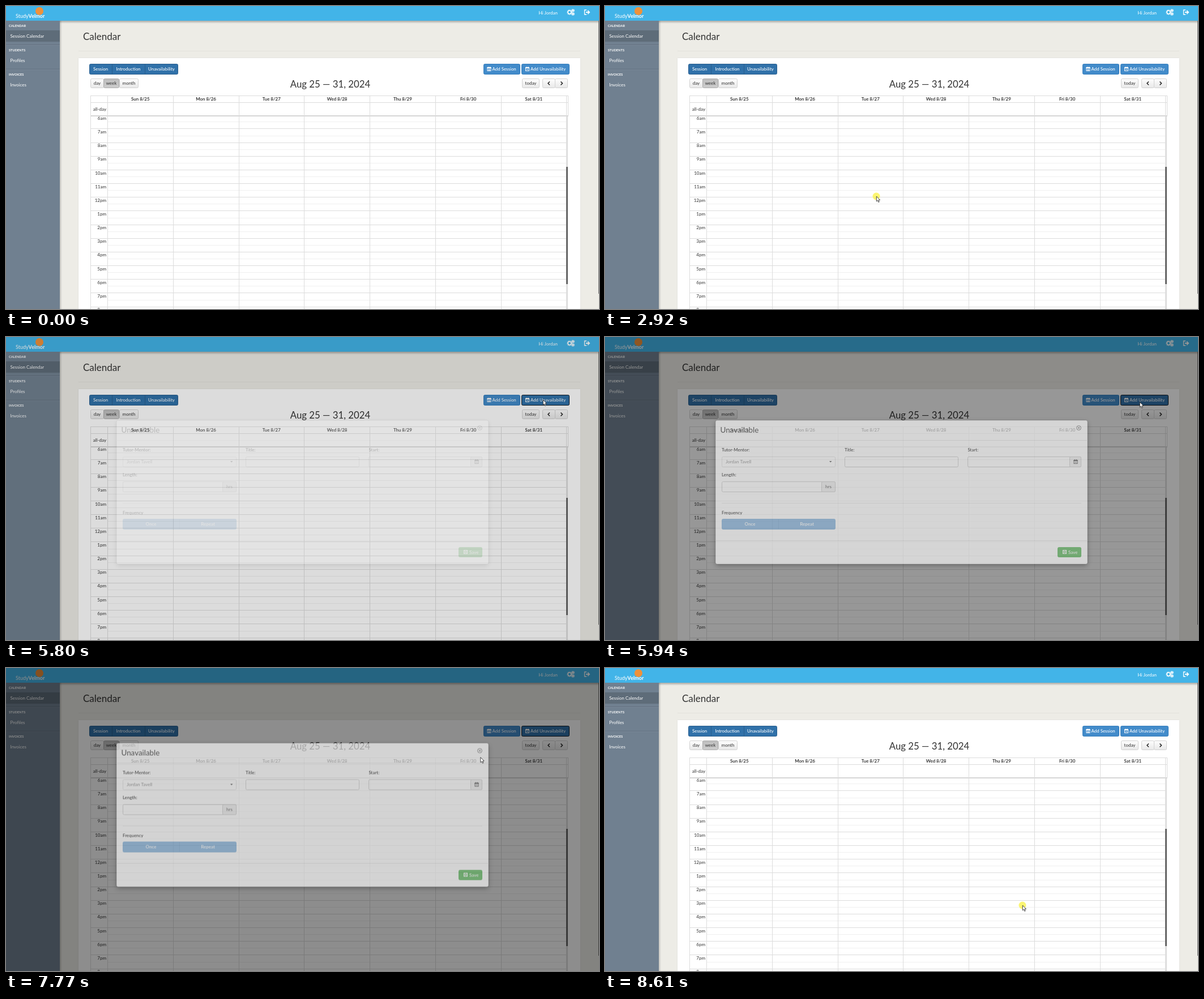
Write an HTML page with a canvas that moves like this. It is 1047x535 px and loops after 8740 ms.

```html
<!DOCTYPE html>
<html lang="en">
<head>
<meta charset="utf-8">
<title>Session calendar</title>
<style>
html, body { margin: 0; width: 100%; height: 100%; overflow: hidden; background: #edece6; }
canvas { display: block; }
</style>
</head>
<body>
<canvas id="stage" width="1047" height="535"></canvas>
<script>
const W = 1047, H = 535, LOOP = 8740, STEP = 70.165, DIM = .68;
const screen = document.getElementById('stage').getContext('2d');
const layer = document.createElement('canvas');
layer.width = W;
layer.height = H;
const dialog = layer.getContext('2d');
let g = screen;

// Pointer path: step, x, y
const path = [
  [0, 988, 517], [3, 870, 465], [7, 480, 340], [10, 290, 281], [12, 260, 296],
  [20, 283, 425], [25, 341, 463], [30, 375, 330], [33, 410, 272], [38, 477, 325],
  [40, 479, 336], [44, 383, 385], [47, 500, 402], [51, 666, 345], [54, 640, 312],
  [58, 558, 390], [62, 680, 480], [64, 771, 462], [68, 839, 388], [73, 925, 210],
  [76, 945, 118], [78, 944, 115], [83, 944, 115], [90, 853, 290], [93, 600, 310],
  [96, 384, 268], [97, 402, 251], [100, 610, 200], [103, 835, 156], [106, 837, 159],
  [110, 837, 164], [116, 828, 261], [121, 737, 419]
];

const clamp = v => Math.max(0, Math.min(1, v));

function pointer(n) {
  let i = 0;
  while (i < path.length - 2 && n > path[i + 1][0]) i++;
  const a = path[i], b = path[i + 1];
  const before = path[Math.max(0, i - 1)], after = path[Math.min(path.length - 1, i + 2)];
  const span = b[0] - a[0], u = clamp((n - a[0]) / span), u2 = u * u, u3 = u2 * u;
  return [1, 2].map(k => {
    const ma = (b[k] - before[k]) / (b[0] - before[0]) * span;
    const mb = (after[k] - a[k]) / (after[0] - a[0]) * span;
    const v = (2 * u3 - 3 * u2 + 1) * a[k] + (u3 - 2 * u2 + u) * ma +
      (3 * u2 - 2 * u3) * b[k] + (u3 - u2) * mb;
    return Math.max(Math.min(a[k], b[k]) - 4, Math.min(Math.max(a[k], b[k]) + 4, v));
  });
}

function rect(x, y, w, h, color) {
  g.fillStyle = color;
  g.fillRect(x, y, w, h);
}

function box(x, y, w, h, fill, border, r = 2) {
  g.beginPath();
  g.roundRect(x + .5, y + .5, w - 1, h - 1, r);
  g.fillStyle = fill;
  g.fill();
  if (border) {
    g.strokeStyle = border;
    g.lineWidth = 1;
    g.stroke();
  }
}

function text(s, x, mid, size, color, align = 'left', weight = 400) {
  g.font = `${weight} ${size}px Lato, "Open Sans", sans-serif`;
  g.textAlign = align;
  g.fillStyle = color;
  g.fillText(s, x, mid + size * .36);
}

function line(points, color, width = 1) {
  g.beginPath();
  points.forEach(([x, y]) => g.lineTo(x, y));
  g.strokeStyle = color;
  g.lineWidth = width;
  g.stroke();
}

function ring(x, y, r, color, width, dash = []) {
  g.beginPath();
  g.arc(x, y, r, 0, 7);
  g.setLineDash(dash);
  g.strokeStyle = color;
  g.lineWidth = width;
  g.stroke();
  g.setLineDash([]);
}

function disc(x, y, r, color) {
  g.beginPath();
  g.arc(x, y, r, 0, 7);
  g.fillStyle = color;
  g.fill();
}

function shade(x, y, w, h, alpha) {
  const f = w < h ? g.createLinearGradient(x, 0, x + w, 0) : g.createLinearGradient(0, y, 0, y + h);
  f.addColorStop(0, `rgba(0,0,0,${alpha})`);
  f.addColorStop(1, 'rgba(0,0,0,0)');
  rect(x, y, w, h, f);
}

function calendarIcon(x, y, color, rows) {
  g.strokeStyle = color;
  g.lineWidth = 1;
  g.strokeRect(x + .5, y + 1.5, 6, 6);
  rect(x, y + 1, 7, 2, color);
  rect(x + 1.5, y, 1, 2, color);
  rect(x + 4.5, y, 1, 2, color);
  rect(x + 2, y + 4.5, 3, 1, color);
  if (rows) {
    rect(x + 2, y + 6, 3, .6, color);
    rect(x + 3.2, y + 3, .6, 5, color);
  }
}

function gear(x, y, r) {
  ring(x, y, r, '#fff', 1.5);
  ring(x, y, r + 1.2, '#fff', 1.2, [r * .45, r * .49]);
}

function grayButton(x, w, label, active) {
  const f = g.createLinearGradient(0, 128, 0, 145);
  f.addColorStop(0, active ? '#bdbdbd' : '#fefefe');
  f.addColorStop(1, active ? '#cdcdcd' : '#e7e7e7');
  box(x, 128, w, 17, f, active ? '#adadad' : '#d2d2d2');
  if (label) text(label, x + w / 2, 136.5, 8, '#333', 'center');
}

function sidebar() {
  rect(0, 26, 95, 509, '#708090');
  rect(0, 43, 95, 20, '#5e6c79');
  [68, 111].forEach(y => {
    rect(0, y, 95, 1, '#637180');
    rect(0, y + 1, 95, 1, '#7a8999');
  });
  [['CALENDAR', 34], ['STUDENTS', 77], ['INVOICES', 120]]
    .forEach(([s, y]) => text(s, 5, y + .5, 5.7, '#fff', 'left', 700));
  [['Session Calendar', 53], ['Profiles', 96], ['Invoices', 139]]
    .forEach(([s, y]) => text(s, 7.5, y, 8, '#fff'));
  shade(95, 26, 4, 509, .18);
}

function header() {
  shade(0, 26, W, 5, .28);
  rect(0, 0, W, 26, '#42b4e8');
  disc(59, 9, 7, '#f0913a');
  text('Study', 17, 18.2, 9, '#fff');
  const w = g.measureText('Study').width;
  text('Velmor', 17 + w, 18.2, 9, '#fff', 'left', 700);
  text('Hi Jordan', 974, 11.7, 8, '#fff', 'right');
  gear(995, 11, 2.9);
  gear(1001, 8, 1.3);
  gear(1001, 14, 1.3);
  line([[1025, 7], [1021.5, 7], [1021.5, 15], [1025, 15]], '#fff', 1.3);
  line([[1024, 11], [1029.5, 11]], '#fff', 2);
  line([[1027, 7.8], [1030.3, 11], [1027, 14.2]], '#fff', 1.5);
}

function grid() {
  const left = 150, top = 158, edge = '#dcdcdc';
  for (let i = 0; i < 15; i++) {
    const y = 216.4 + i * 24.17;
    rect(180, Math.round(y - 12), 809, 1, '#f0f0f0');
    rect(left, Math.round(y), 839, 1, edge);
    text(((i + 5) % 12 + 1) + (i < 6 ? 'am' : 'pm'), 177, 198 + i * 24.16, 8, '#333', 'right');
  }
  rect(left, top, 843, 36, '#fff');
  for (const y of [top, 170]) rect(left, y, 843, 1, edge);
  rect(left, 193, 843, 2, '#d6d6d6');
  rect(left - 1, top, 1, H, edge);
  for (let i = 0; i < 8; i++) rect(Math.round(179 + i * 115.75), top, 1, H, edge);
  rect(992, top, 1, 37, edge);
  ['Sun', 'Mon', 'Tue', 'Wed', 'Thu', 'Fri', 'Sat'].forEach((d, i) =>
    text(`${d} 8/${25 + i}`, 237.3 + i * 115.75, 163.8, 7.9, '#222', 'center', 600));
  text('all-day', 177, 181.7, 8, '#333', 'right');
  rect(989, 195, 3, 340, '#dedede');
  rect(989, 284, 3, 207, '#666');
}

function page(focus) {
  rect(0, 0, W, H, '#edece6');
  text('Calendar', 136, 53.7, 17, '#333');
  rect(128, 79, 886, 1, '#e3e2dc');
  box(127, 91, 888, 460, '#fff', '#e5e4df', 1);

  box(147, 102, 157, 19, '#3071a9', '#285e8e');
  rect(187, 103, 1, 17, '#285e8e');
  rect(245, 103, 1, 17, '#285e8e');
  [['Session', 167], ['Introduction', 216], ['Unavailability', 274.5]]
    .forEach(([s, x]) => text(s, x, 111.3, 7.9, '#fff', 'center', 500));

  box(843, 102, 65, 19, '#428bca', '#357ebd');
  if (focus) box(909, 101, 87, 21, '#fff');
  box(910, 102, 85, 19, focus ? '#3071a9' : '#428bca', focus ? '#101820' : '#357ebd');
  calendarIcon(849.5, 107, '#fff', true);
  calendarIcon(917, 107, '#fff', false);
  text('Add Session', 858.5, 111.3, 7.9, '#fff', 'left', 500);
  text('Add Unavailability', 926, 111.3, 7.8, '#fff', 'left', 500);

  grayButton(149, 24, 'day');
  grayButton(200, 34, 'month');
  grayButton(172, 28, 'week', true);
  grayButton(911, 31, 'today');
  grayButton(947, 23);
  grayButton(969, 23);
  line([[960, 133.5], [957, 136.5], [960, 139.5]], '#222', 1.5);
  line([[979.5, 133.5], [982.5, 136.5], [979.5, 139.5]], '#222', 1.5);
  text('Aug 25 — 31, 2024', 572.5, 137.5, 16.8, '#333', 'center');

  grid();
  header();
  sidebar();
  rect(1046, 26, 1, 482, '#6b6b6b');
}

function field(x, y, w, border = '#ccc') {
  box(x, y, w, 19, '#fff', border);
}

function modal() {
  g.clearRect(0, 0, W, H);
  g.shadowColor = 'rgba(0,0,0,.5)';
  g.shadowBlur = 9;
  g.shadowOffsetY = 3;
  box(195, 147, 657, 254, '#fff', null, 3);
  g.shadowColor = 'transparent';
  box(194.5, 146.5, 658, 255, '#fff', 'rgba(0,0,0,.25)', 3);

  text('Unavailable', 203.5, 164, 13.4, '#333');
  ring(836.5, 160.5, 3.9, '#666', .9);
  line([[835, 159], [838, 162]], '#555', 1);
  line([[838, 159], [835, 162]], '#555', 1);
  rect(195, 182, 657, 1, '#e5e5e5');
  rect(206, 293, 635, 1, '#e8e8e8');
  rect(195, 359, 657, 1, '#e5e5e5');

  [['Tutor-Mentor:', 206, 199], ['Title:', 423, 199], ['Start:', 640.5, 199],
    ['Length:', 206, 243], ['Frequency', 206, 309.7]]
    .forEach(([s, x, y]) => text(s, x, y, 7.9, '#222', 'left', 500));

  field(206, 211, 201, '#e0e0e0');
  text('Jordan Tavell', 213, 220, 8, '#888');
  g.beginPath();
  g.moveTo(396, 219);
  g.lineTo(400.5, 219);
  g.lineTo(398.2, 221.5);
  g.fillStyle = '#555';
  g.fill();

  field(423, 211, 201);
  field(640, 211, 201);
  box(820, 211, 21, 19, '#eee', '#ccc');
  calendarIcon(827.5, 216, '#555', false);
  field(206, 255, 201);
  box(382, 255, 25, 19, '#eee', '#ccc');
  text('hrs', 394.5, 264, 8, '#555', 'center');

  box(206, 321, 201, 19, '#84b3dd', '#80b0db');
  rect(306, 322, 1, 17, '#76a5d2');
  text('Once', 256, 330.5, 8, '#fff', 'center', 600);
  text('Repeat', 356.5, 330.5, 8, '#fff', 'center', 600);

  box(799, 371, 42, 18, '#5cb85c', '#58b458');
  g.strokeStyle = '#fff';
  g.lineWidth = 1;
  g.strokeRect(808.5, 376.5, 6, 6);
  g.strokeRect(810, 376.5, 3, 2);
  g.strokeRect(810, 380.5, 3, 2);
  text('Save', 818, 380.2, 8, '#fff', 'left', 500);
}

function cursor(x, y, glow) {
  if (glow) disc(x, y, 6.5, 'rgba(250,242,80,.8)');
  g.beginPath();
  [[0, 0], [0, 9], [2, 7.2], [3.6, 10.5], [5, 9.8], [3.6, 6.6], [6.3, 6.4]]
    .forEach(([dx, dy]) => g.lineTo(x + dx + .3, y + dy));
  g.closePath();
  g.fillStyle = '#fff';
  g.fill();
  g.strokeStyle = '#333';
  g.lineWidth = .9;
  g.stroke();
}

function draw(t) {
  const n = t < 120 ? -1 : Math.min(121, Math.floor((t - 120) / STEP + .15));
  const opening = clamp((n - 80) / 5), closing = clamp((n - 108) / 4);
  const dim = DIM * opening * Math.pow(1 - closing, 1.45);

  g = screen;
  page((n >= 78 && n < 84) || (n > 108 && n < 116));
  if (dim > 0) {
    rect(0, 0, W, H, `rgba(0,0,0,${dim})`);
    g = dialog;
    modal();
    g = screen;
    g.globalAlpha = opening * Math.pow(1 - closing, 1.7);
    g.drawImage(layer, 0, -58 * closing);
    g.globalAlpha = 1;
  }
  if (n >= 0) {
    const [x, y] = pointer(n);
    cursor(x, y, n < 63 || n > 116);
  }
}

const start = performance.now();
function tick() {
  draw((performance.now() - start) % LOOP);
  requestAnimationFrame(tick);
}
tick();
</script>
</body>
</html>
```
